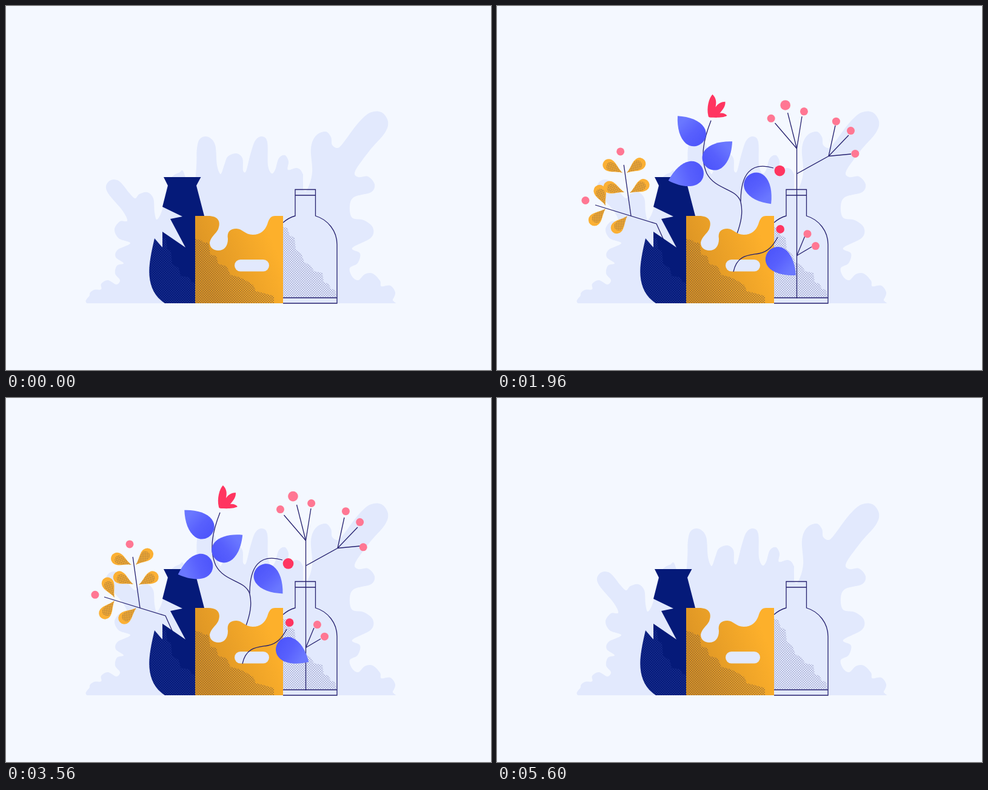
Recreate the animation shown at these times as an HTML page. Size 800 by 600 pixels, loop 6 s.

```html
<!DOCTYPE html>
<html lang="en">
<head>
<meta charset="utf-8">
<title>Growing plants</title>
<style>
html, body { margin: 0; height: 100%; overflow: hidden; background: #f4f8ff; }
svg { display: block; width: 800px; height: 600px; }
.line { fill: none; stroke: #25216f; stroke-width: 1.3; }
</style>
</head>
<body>
<svg viewBox="0 0 800 600">
  <defs>
    <linearGradient id="amber" x1="0" y1=".7" x2="1" y2=".3">
      <stop offset=".1" stop-color="#dc9424"/><stop offset=".9" stop-color="#fdb02b"/>
    </linearGradient>
    <linearGradient id="blue">
      <stop offset="0" stop-color="#4d55fb"/><stop offset=".4" stop-color="#5860fd"/><stop offset=".8" stop-color="#6a77ff"/>
    </linearGradient>
    <clipPath id="ground"><rect width="800" height="490"/></clipPath>
    <clipPath id="vaseClip"><use href="#vase"/></clipPath>
    <clipPath id="boxClip"><use href="#box"/></clipPath>
    <g id="leaf"><path fill="url(#blue)" d="M60 0C46-14 30-22 17-20C5-18 0-8 0 0C0 8 5 18 17 20C30 22 46 14 60 0Z"/></g>
    <g id="drop">
      <path fill="#fbb034" d="M0 0C11-3 17-10 26-10A10 10 0 0 1 26 10C17 10 11 3 0 0Z"/>
      <path fill="url(#brownDots)" d="M0 0C10-2 15-8 24-8Q31-4 29 2Q28 7 21 7C15 7 9 2 0 0Z"/>
    </g>
    <g id="flower"><path fill="#ff3560" d="M-2-3C-5-16-1-32 5-38C11-32 12-26 10-17C14-23 20-26 26-26C27-19 22-13 17-7C22-8 27-6 29-3C22 1 10 0 2 0Q-2 0-2-3Z"/></g>
    <circle id="pink" r="6.5" fill="#ff7793"/>
    <circle id="red" r="6.8" fill="#ff3560"/>
  </defs>
  <g id="bush" fill="#e2e9fd" clip-path="url(#ground)"></g>
  <g id="left"></g>
  <path id="vase" fill="#051a79" d="M260 282H321.500L314 296L327 346L312 490H262C240 476 234 452 237 425C239 408 243 392 245 383L258 398V372L296 398L271 351L291 347L258 331L267 296Z"/>
  <g clip-path="url(#vaseClip)"><path fill="url(#skyDots)" d="M230 383H264L266 400L272 404L274 425L285 432L288 445L302 447L306 455L312 456V490H230Z"/></g>
  <g id="middle"></g>
  <path fill="url(#navyDots)" d="M457 364L464 366L468 378L476 382L478 402L487 408L492 422L503 428L508 437L522 440L524 455L532 458L536 466L543 468L545 481H457Z"/>
  <path class="line" d="M457 357Q466 349 477 346V302.500H510.500V346C531 352 546 371 546 393V490H457M477 312H510.500M457 481H546"/>
  <g id="right"></g>
  <path id="box" fill="url(#amber)" d="M312 346H333C350 346 355 355 350 368C346 376 338 380 336 390C336 398 342 403 350 403C360 403 366 396 366 384C364 372 370 367 380 367C390 367 394 377 407 377C420 377 427 370 431 360C434 350 437 346 444 346H457V490H312Z"/>
  <g clip-path="url(#boxClip)"><path fill="url(#brownDots)" d="M312 384L322 386L326 390H334L337 410L347 412L350 425L364 429L370 443L385 447L395 452L408 460L412 470L428 474L442 478V490H312Z"/></g>
  <rect x="377" y="418" width="57" height="19.500" rx="9.700" fill="#e2e9fd"/>
  <g id="front"></g>
</svg>
<script>
const $ = id => document.getElementById(id);
const NS = 'http://www.w3.org/2000/svg';
const add = (parent, tag, attrs) => {
  const el = parent.appendChild(document.createElementNS(NS, tag));
  for (const k in attrs) el.setAttribute(k, attrs[k]);
  return el;
};

// Halftone textures
for (const [id, fill, r] of [['navyDots', '#25216f', .62], ['brownDots', '#5a4840', .72], ['skyDots', '#4a61c4', .55]]) {
  const p = add(document.querySelector('defs'), 'pattern', { id, width: 4, height: 4, patternUnits: 'userSpaceOnUse' });
  for (const c of [1, 3]) add(p, 'circle', { cx: c, cy: c, r, fill });
}

// Closed smooth outline through a list of points
function blob(text) {
  const p = text.split(' ').map(s => s.split(',').map(Number)), n = p.length;
  let d = 'M' + p[0];
  for (let i = 0; i < n; i++) {
    const [a, b, c, e] = [n - 1, 0, 1, 2].map(k => p[(i + k) % n]);
    d += `C${b.map((v, j) => v + (c[j] - a[j]) / 6)} ${c.map((v, j) => v - (e[j] - b[j]) / 6)} ${c}`;
  }
  add($('bush'), 'path', { d: d + 'Z' });
}
blob('148,494 138,476 145,468 157,467 157,458 168,452 182,459 188,452 180,441 183,428 194,424 181,414 184,402 205,391 186,383 179,368 188,355 200,354 192,337 170,311 165,297 173,287 187,289 204,309 213,317 220,310 233,307 243,317 245,340 249,352 258,335 268,290 285,275 296,283 320,400 320,500');
blob('290,500 312,290 315,235 321,218 334,216 345,229 348,262 354,277 360,262 366,248 380,243 390,251 391,271 396,272 403,245 411,222 422,215 431,224 432,262 438,276 444,270 450,251 460,246 466,256 465,270 480,267 489,276 490,300 490,500');
blob('470,500 480,320 496,304 505,275 503,235 511,214 527,207 536,216 538,229 547,234 556,226 580,194 600,176 619,175 630,190 625,209 600,238 576,272 581,282 597,281 608,294 602,307 574,315 567,330 571,349 590,353 605,365 602,382 571,399 584,408 580,424 567,432 571,446 581,452 592,442 605,441 617,453 619,462 634,461 642,472 638,484 630,496');

// Stems: layer, path, start, duration, share that stays after the overshoot
const stems = [
  ['left', 'M276 388L263 359L162 328', 500, 540],
  ['left', 'M221 346L208.500 257', 900, 400, .945],
  ['middle', 'M395 378C403 356 406 340 402 323C395 300 361 304 346 276C333 246 343 212 357 179', 560, 800, .955],
  ['middle', 'M402 322C402 278 418 256 456 267', 1180, 380],
  ['right', 'M494.500 482V235', 440, 620],
  ['right', 'M494.500 276.500L547 247.500', 980, 160],
  ['right', 'M547 247.500L558 197', 1110, 290],
  ['right', 'M547 247.500L580 213', 1110, 290],
  ['right', 'M547 247.500L584 244', 1110, 290],
  ['right', 'M494.500 235L458.500 193', 1060, 280],
  ['right', 'M494.500 235L479.500 176', 1060, 280],
  ['right', 'M494.500 235L503 182', 1060, 280],
  ['right', 'M494.500 411.500L508 379', 900, 350],
  ['right', 'M494.500 411.500L519 397', 900, 350],
  ['front', 'M390 438C396 410 415 411 432 408C448 405 456 394 463 381', 440, 600],
].map(([layer, d, start, dur, keep = 1]) => ({
  el: add($(layer), 'path', { class: 'line', d, pathLength: 1 }), start, dur, keep,
}));

// Leaves: layer, shape, base, start, angle before and after the sway
const leaves = [
  ['left', 'drop', 207, 275, 1370, -148, -157],
  ['left', 'drop', 214, 275, 1345, -32, -43],
  ['left', 'drop', 210, 307, 1300, -164, -153],
  ['left', 'drop', 219, 308, 1020, -30, -29],
  ['left', 'drop', 179, 329, 1020, -110, -116],
  ['left', 'drop', 179, 334, 1020, 137, 127],
  ['left', 'drop', 215, 346, 1230, 129, 140],
  ['middle', 'leaf', 338, 226, 1420, -130, -137],
  ['middle', 'leaf', 344, 264, 1345, -44, -39.5],
  ['middle', 'leaf', 340, 270, 1330, 164, 159.5],
  ['middle', 'leaf', 415, 279, 1345, 54, 46],
  ['front', 'leaf', 448, 404, 1060, 45.5, 30.5],
].map(([layer, shape, x, y, start, from, to]) => ({ layer, shape, start, a: [x, y, from], b: [x, y, to] }));

// Berries and the flower: layer, shape, start, place before and after the sway, size
const berries = [
  ['left', 'pink', 1370, 203.5, 239.5, 204, 241],
  ['left', 'pink', 1370, 145.5, 319, 147, 324.5],
  ['middle', 'flower', 1350, 349.5, 184.5, 353, 182],
  ['middle', 'red', 1450, 466.7, 271, 465.5, 273, 1.3],
  ['right', 'pink', 1390, 452, 186, 452.5, 183.5],
  ['right', 'pink', 1370, 476.5, 164, 473.3, 162, 1.28],
  ['right', 'pink', 1400, 507.5, 174, 503.5, 173.5],
  ['right', 'pink', 1265, 559, 191.5, 560.5, 186.5],
  ['right', 'pink', 1220, 583.5, 206, 583.7, 204.5],
  ['right', 'pink', 1300, 591.5, 242.5, 589.2, 246],
  ['right', 'pink', 1380, 511.5, 376.5, 513.5, 373.5],
  ['right', 'pink', 1400, 525.5, 396.5, 525.5, 393],
  ['front', 'red', 1040, 467, 367, 467.7, 370.3],
].map(([layer, shape, start, x, y, x2, y2, size]) => ({ layer, shape, start, a: [x, y, 0], b: [x2, y2, 0], size }));

const parts = [...leaves, ...berries];
for (const p of parts) p.el = add($(p.layer), 'use', { href: '#' + p.shape });

const part = (t, start, dur) => Math.min(1, Math.max(0, (t - start) / dur));
const smooth = x => x * x * (3 - 2 * x);
const pop = x => 1 + 2.7 * (x - 1) ** 3 + 1.7 * (x - 1) ** 2;

function draw(t) {
  // The second half runs the first half backwards
  const m = t > 3020 ? 6040 - t : t;
  const sway = .5 - .5 * Math.cos(Math.PI * part(m, 1720, 900) ** .8);
  for (const { el, start, dur, keep } of stems) {
    const shown = smooth(part(m, start, dur)) - (1 - keep) * smooth(part(m, 1400, 200));
    el.style.visibility = shown > 0 ? 'visible' : 'hidden';
    el.setAttribute('stroke-dasharray', `${shown} 2`);
  }
  for (const { el, start, a, b, size = 1 } of parts) {
    const [x, y, angle] = a.map((v, i) => v + (b[i] - v) * sway);
    const k = Math.max(0, pop(part(m, start, 450))) * size;
    el.style.visibility = k > .001 ? 'visible' : 'hidden';
    el.setAttribute('transform', `translate(${x} ${y}) rotate(${angle}) scale(${k})`);
  }
}

const begin = performance.now();
function tick() {
  const t = (performance.now() - begin) % 6000;
  draw(Math.floor(t / 40) * 40);
  requestAnimationFrame(tick);
}
tick();
</script>
</body>
</html>
```
